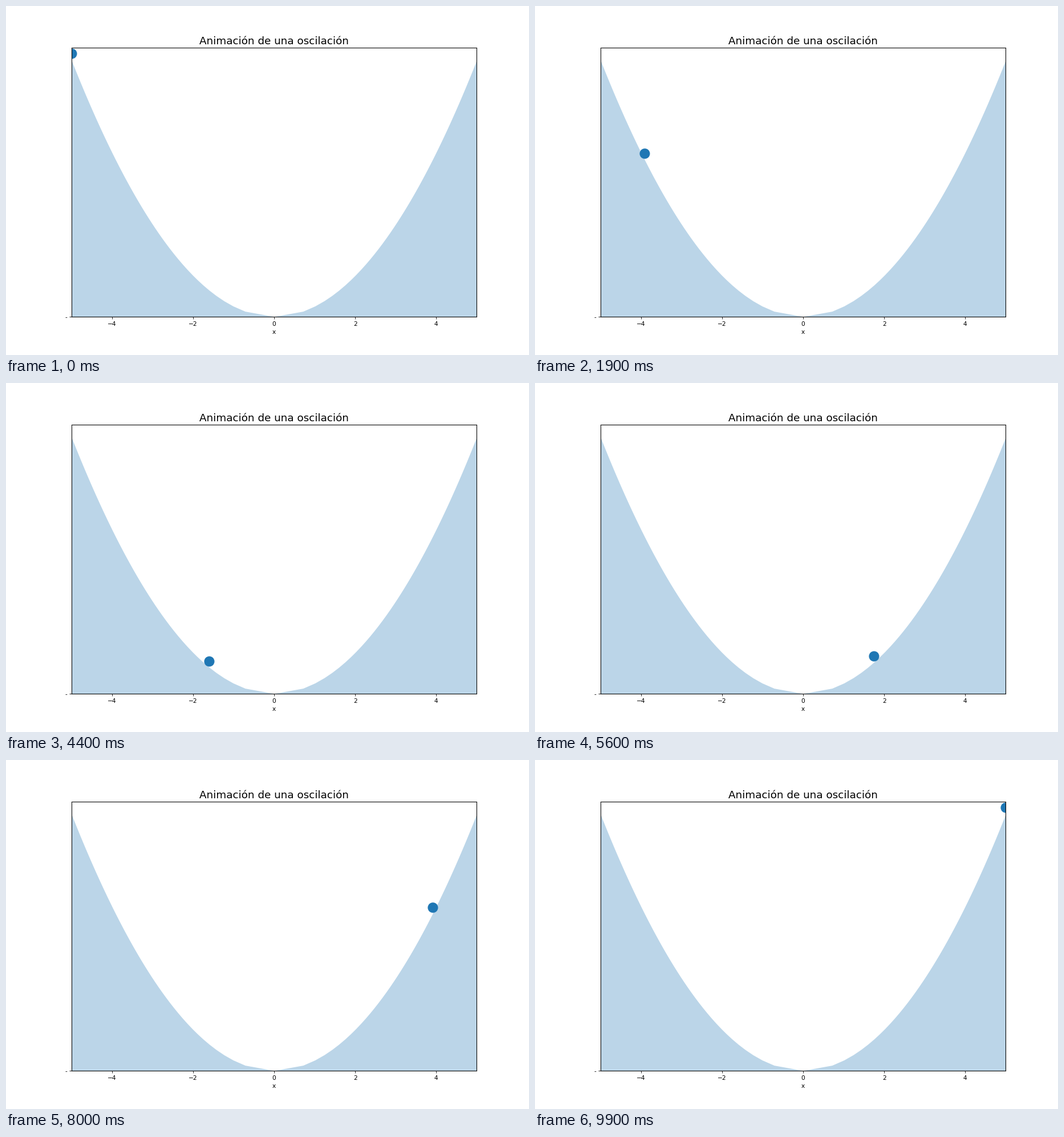
A matplotlib script that plays this animation: 917 by 611 pixels, repeating every 10 s.

```python
import numpy as np
import matplotlib.pyplot as plt
from matplotlib.animation import FuncAnimation

FRAMES, INTERVAL = 100, 100
LIFT = 0.62  # ball height above the curve

# The potential falls and rises at a steady rate; x follows as its root.
rise = np.linspace(0, 25, FRAMES // 2)
x = np.concatenate([-np.sqrt(rise[::-1]), np.sqrt(rise)])
potential = x ** 2

plt.rcParams.update({"font.family": "DejaVu Sans", "axes.linewidth": 1})
fig, ax = plt.subplots(figsize=(12, 8), dpi=76.424)  # 917 x 611 pixels
ax.set_xlim(-5, 5)
ax.set_ylim(0, 26.2)
ax.set_yticks([0], ["-"])
ax.set_xlabel("x")
ax.set_title("Animación de una oscilación", fontsize="xx-large")

ax.fill_between(x, potential, color="C0", alpha=0.3, linewidth=0)
ball, = ax.plot([x[0]], [potential[0] + LIFT], "o", color="C0", markersize=16)


def update(i):
    ball.set_data([x[i]], [potential[i] + LIFT])
    return (ball,)


anim = FuncAnimation(fig, update, frames=FRAMES, interval=INTERVAL,
                     repeat=True, repeat_delay=0)
plt.show()
```
